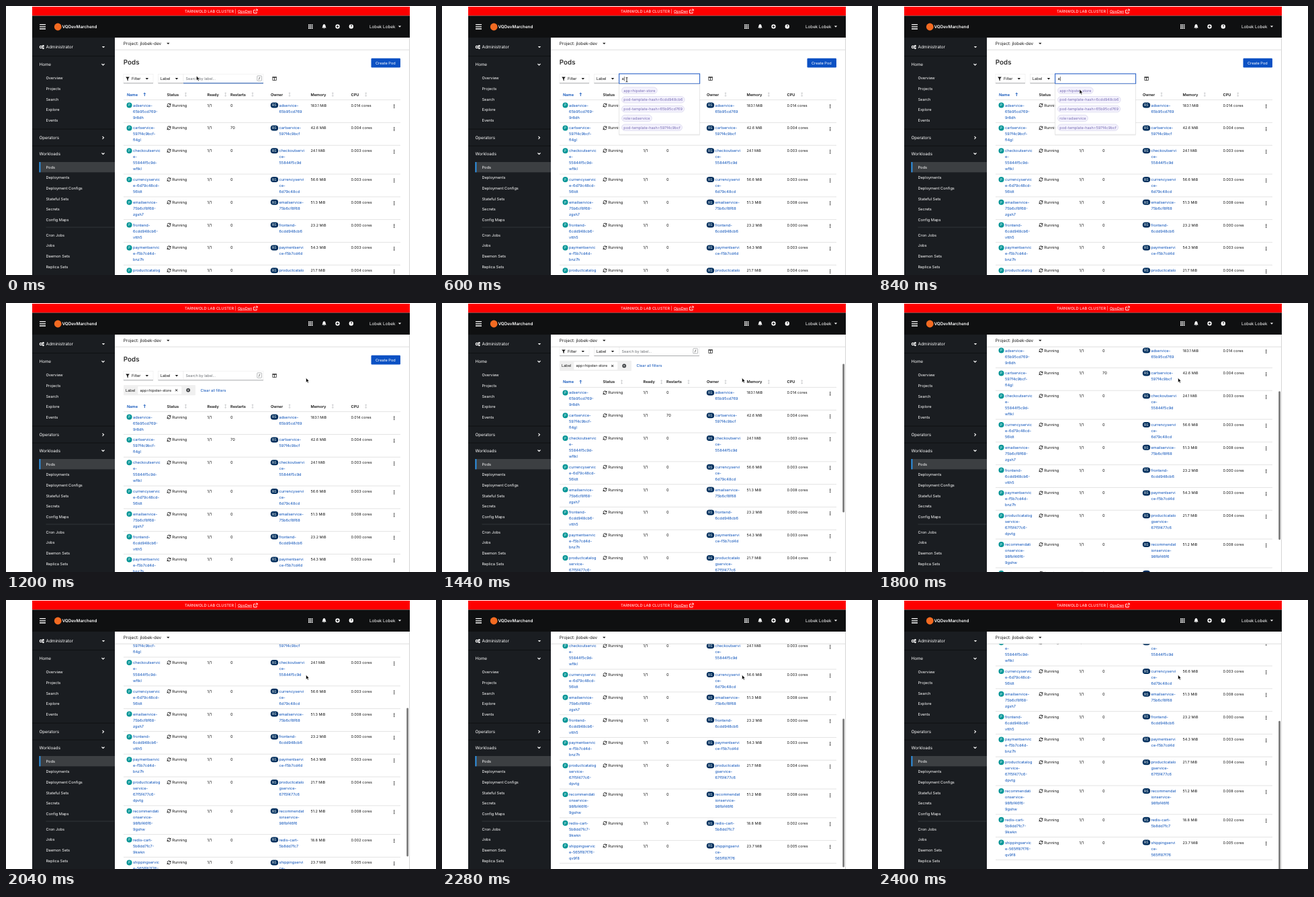
Write an HTML page that moves like this. It is 640 by 400 pixels and loops after 2520 ms.

```html
<!DOCTYPE html>
<html lang="en">
<head>
<meta charset="utf-8">
<title>Pod list filter</title>
<style>
html, body { margin: 0; width: 100%; height: 100%; overflow: hidden; background: #fff; }
svg { display: block; width: 640px; height: 400px; }
text { font-family: Inter, "Open Sans", sans-serif; text-rendering: geometricPrecision; white-space: pre; }
</style>
</head>
<body>
<svg id="stage" viewBox="0 0 640 400" xmlns="http://www.w3.org/2000/svg"></svg>
<script>
const INK = '#151515', LINK = '#0a50b8', GREY = '#6a6e73', RULE = '#d0d0d0';
const STEP = 120, STEPS = 21;

// y is the vertical middle of the capitals
const text = (x, y, s, fill = INK, size = 5.7, more = '') =>
  `<text x="${x}" y="${y + size * 0.36}" font-size="${size}" fill="${fill}" ${more}>${s}</text>`;
const rect = (x, y, w, h, fill, more = '') =>
  `<rect x="${x}" y="${y}" width="${w}" height="${h}" fill="${fill}" ${more}/>`;
const line = (d, stroke, width = 0.6, more = '') =>
  `<path d="${d}" fill="none" stroke="${stroke}" stroke-width="${width}" ${more}/>`;
const shape = (d, fill) => `<path d="${d}" fill="${fill}"/>`;
const disc = (x, y, r, fill) => `<circle cx="${x}" cy="${y}" r="${r}" fill="${fill}"/>`;
const group = (id, body, more = '') => `<g id="${id}" ${more}>${body}</g>`;

const caret = (x, y, fill = INK) => shape(`M${x - 2.2} ${y - 1.1}h4.4l-2.2 2.4z`, fill);
const chevron = (x, y, right) =>
  line(right ? `M${x - 1} ${y - 2}l2 2l-2 2` : `M${x - 2} ${y - 1}l2 2l2 -2`, '#fff', 1.1);
const cross = (x, y, r, color, width) =>
  line(`M${x - r} ${y - r}l${2 * r} ${2 * r}m0 ${-2 * r}l${-2 * r} ${2 * r}`, color, width);

function topBars() {
  let grid = '';
  for (let i = 0; i < 9; i++) grid += rect(450 + i % 3 * 2.4, 27.4 + Math.floor(i / 3) * 2.4, 1.7, 1.7, '#fff');
  return rect(39, 1, 562, 13.5, '#fe0000') +
    text(266, 7.6, 'TARNWOLD LAB CLUSTER | ', '#fff', 5.75) +
    text(345, 7.6, 'OpsDen', '#fff', 5.6, 'text-decoration="underline"') +
    line('M371 6h-2.4v4.6h4.6v-2M371 8.4l3 -3M371.8 5h2.4v2.4', '#fff', 0.9) +
    rect(39, 14.5, 562, 32.5, '#0f1011') +
    line('M50 27.6h9M50 30.8h9M50 34h9', '#fff', 1.3) +
    disc(77.2, 31, 5.4, '#f26a21') +
    text(83.5, 31, 'VQDevMarchend', '#fff', 6.3, 'font-weight="600"') +
    grid +
    shape('M470.3 32.4q1.1 -1 1.1 -3q.2 -1.9 2.1 -2.3q1.9 .4 2.1 2.3q0 2 1.1 3zM472.6 32.9h1.8q-.9 1.4 -1.8 0z', '#fff') +
    disc(493.5, 30.5, 3.2, '#fff') + line('M491.7 30.5h3.6M493.5 28.7v3.6', INK, 1) +
    disc(513.8, 30.5, 3.2, '#fff') + text(512.4, 30.5, '?', INK, 5, 'font-weight="700"') +
    text(541, 30.5, 'Lobek Lobek', '#fff', 6.3) + caret(586, 30.5, '#fff');
}

function sidebar() {
  const items = (first, names) =>
    names.map((name, i) => text(59.5, first + i * 15.65, name, '#fff', 5.65)).join('');
  const gear = (x, y, r) => `<circle cx="${x}" cy="${y}" r="${r}" fill="none" stroke="#fff" stroke-width="1.2"/>`;
  return rect(39, 47, 123, 353, '#1a1d21') +
    line('M39 74.5h123M39 183h123M39 208h123', '#0c0d0f', 0.8) +
    line('M59.5 329h102', '#3c3f42', 0.7) +
    gear(52, 61, 1.7) + gear(55.4, 59.4, 0.8) + gear(55.4, 62.8, 0.8) +
    text(59.5, 61, 'Administrator', '#fff', 6.4) + caret(145, 61, '#fff') +
    text(49.5, 87.2, 'Home', '#fff', 6.25) + chevron(144.5, 87) +
    items(107.3, ['Overview', 'Projects', 'Search', 'Explore', 'Events']) +
    text(49.5, 196, 'Operators', '#fff', 6.25) + chevron(144.5, 195.8, true) +
    text(49.5, 219.5, 'Workloads', '#fff', 6.25) + chevron(144.5, 219.5) +
    rect(49.5, 232, 112.5, 15.3, '#3c3f42') + rect(49.5, 232, 1.8, 15.3, '#2b9af3') +
    items(239.6, ['Pods', 'Deployments', 'Deployment Configs', 'Stateful Sets', 'Secrets', 'Config Maps']) +
    items(340.6, ['Cron Jobs', 'Jobs', 'Daemon Sets', 'Replica Sets']);
}

function toolbar() {
  const box = (x, w) => rect(x, 101.2, w, 13.6, '#fff', 'stroke="#ececec" stroke-width=".6"') +
    line(`M${x} 114.8h${w}`, '#8a8d90', 0.7);
  return text(174.8, 83.3, 'Pods', INK, 9.9, 'font-weight="500"') +
    rect(543.5, 77.8, 43.5, 13.6, '#0b51c4', 'rx="1.2"') + text(550, 84.6, 'Create Pod', '#fff', 5.65) +
    box(175, 44) + shape('M178.2 105.6h5.6l-2.1 2.6v3l-1.4 -1v-2z', INK) +
    text(187, 108, 'Filter') + caret(209.8, 108.2) +
    box(226.5, 37.5) + text(229.8, 108, 'Label') + caret(254, 108.2) +
    box(264, 119) +
    group('hint', text(267.5, 108, 'Search by label...', GREY, 5.5) +
      rect(373.8, 103.8, 6.8, 7.6, '#fff', 'rx="1" stroke="#8a8d90" stroke-width=".6"') +
      line('M378 105.6l-1.8 4', INK, 0.6)) +
    group('hover', line('M264 114.8h119', '#0b51c4', 0.8)) +
    rect(396.9, 105.6, 5.4, 5, '#fff', 'stroke="#151515" stroke-width=".7"') +
    line('M396.9 106.3h5.4M399.6 106v4.6', INK, 0.8);
}

const chips = () =>
  rect(175, 122, 107, 15.3, '#f0f0f0', 'rx="1"') + text(178, 129.6, 'Label', INK, 5.6) +
  rect(196.3, 123.9, 65, 11.6, '#fff', 'rx="1"') + text(199.5, 129.6, 'app=hipster-store', INK, 5.5) +
  cross(253.6, 129.7, 1.5, INK, 1) +
  disc(271.2, 129.6, 2.9, '#3c3f42') + cross(271.2, 129.6, 1.1, '#fff', 0.8) +
  text(289.5, 129.6, 'Clear all filters', LINK, 5.6);

// name, hash, pod suffix, memory, cores, restarts; "/" marks a wrap in pod and owner names
const PODS = [
  ['adservice-/65b95cd769-/9r8dh', 'adservice-/65b95cd769', '183.1', '0.014'],
  ['cartservice-/597f4c9bcf-/fl4gl', 'cartservice-/597f4c9bcf', '42.6', '0.004', 70],
  ['checkoutservic/e-/55844f5c9d-/wftkl', 'checkoutservi/ce-/55844f5c9d', '24.1', '0.003'],
  ['currencyservic/e-6d79c48cd-/56ldt', 'currencyservi/ce-/6d79c48cd', '56.6', '0.003'],
  ['emailservice-/75b6cf8f68-/zgsh7', 'emailservice-/75b6cf8f68', '51.3', '0.008'],
  ['frontend-/6cdd948cb6-/vtth5', 'frontend-/6cdd948cb6', '23.2', '0.000'],
  ['paymentservic/e-f5b7cd4d-/bnz7h', 'paymentservi/ce-f5b7cd4d', '54.3', '0.003'],
  ['productcatalog/service-/67f5f477c6-/dpvtg', 'productcatalo/gservice-/67f5f477c6', '21.7', '0.004'],
  ['recommendati/onservice-/98fbf46f6-/9gshw', 'recommendat/ionservice-/98fbf46f6', '51.2', '0.008'],
  ['redis-cart-/5b8dd7fc7-/9kwkn', 'redis-cart-/5b8dd7fc7', '18.8', '0.002'],
  ['shippingservic/e-565ff87f76-/qv9f8', 'shippingservi/ce-/565ff87f76', '23.7', '0.005'],
];

function table() {
  const bold = 'font-weight="600"';
  const columns = [['Status', 239.5, 267.5], ['Ready', 299.5, 326.7], ['Restarts', 334, 367],
    ['Owner', 394, 422], ['Memory', 453.5, 486.3], ['CPU', 513.5, 535.7]];
  const wrapped = (x, y, s) =>
    s.split('/').map((part, i) => text(x, y + i * 9, part, LINK, 5.65)).join('');
  const sync = (x, y) =>
    line(`M${x - 2.4} ${y - 0.4}a2.5 2.5 0 0 1 4.4 -1.2M${x + 2.4} ${y + 0.4}a2.5 2.5 0 0 1 -4.4 1.2`, INK, 0.9) +
    shape(`M${x + 2.8} ${y - 3}v2.6h-2.6zM${x - 2.8} ${y + 3}v-2.6h2.6z`, INK);

  let out = text(180, 131.6, 'Name', LINK, 5.7, bold) +
    line('M206.3 134v-4.8M204.8 130.7l1.5 -1.6l1.5 1.6', LINK, 0.9);
  for (const [name, x, arrow] of columns) {
    out += text(x, 131.6, name, INK, 5.7, bold) +
      line(`M${arrow} 129v5.2M${arrow - 1.2} 130l1.2 -1.2l1.2 1.2M${arrow - 1.2} 133.2l1.2 1.2l1.2 -1.2`, '#b0b3b6', 0.6);
  }
  out += line('M175 139.6h412', RULE);

  let y = 147.6;
  for (const [pod, owner, memory, cores, restarts = 0] of PODS) {
    out += disc(183.5, y, 4, '#009596') + text(181.9, y, 'P', '#fff', 5.2) + wrapped(189, y, pod) +
      sync(242.5, y) + text(247.3, y, 'Running') +
      text(299.5, y, '1/1') + text(334, y, restarts) +
      rect(393.8, y - 4, 11.4, 8, '#002f5d', 'rx="4"') + text(396, y, 'RS', '#fff', 5.2) + wrapped(406.5, y, owner) +
      text(453.5, y, memory + ' MiB', INK, 5.5) + text(513.5, y, cores + ' cores', INK, 5.5);
    for (const dy of [-0.7, 1.5, 3.7]) out += disc(577.7, y + dy, 0.75, INK);
    y += 6.8 + 9 * pod.split('/').length;
    out += line(`M175 ${y - 8}h412`, RULE);
  }
  return out;
}

function searchMenu() {
  const labels = ['app=hipster-store', 'pod-template-hash=6cdd948cb6', 'pod-template-hash=65b95cd769',
    'role=adservice', 'pod-template-hash=597f4c9bcf'];
  const pills = labels.map((label, i) => {
    const y = 125.6 + i * 13.75;
    return '<g class="pill">' +
      rect(267.6, y - 4.7, 0, 9.4, '#f4f2fd', 'rx="4.7" stroke="#cfcbe8" stroke-width=".6"') +
      text(270.3, y, label, '#7a6fb5', 5.55) + '</g>';
  }).join('');
  return group('focus', rect(263.6, 100.8, 120, 14.6, '#fff', 'stroke="#2b63c8" stroke-width="1.1"')) +
    group('menu', rect(263, 116.4, 121, 76, '#000', 'opacity=".07" rx="1"') +
      rect(263.6, 116, 119.8, 75, '#fff', 'stroke="#dedede" stroke-width=".6"') + pills +
      text(267.5, 108.2, 'a', INK, 5.7)) +
    group('caret', line('M0 105v6.5', INK, 0.6));
}

const stage = document.getElementById('stage');
stage.innerHTML =
  '<clipPath id="view"><rect x="162" y="65" width="438" height="335"/></clipPath>' +
  group('page', rect(39, 0, 562, 400, '#fff') +
    '<g clip-path="url(#view)">' +
    group('content', toolbar() + group('chips', chips()) + group('table', table()) + searchMenu()) + '</g>' +
    text(174.8, 55.6, 'Project: jlobek-dev', INK, 6.35) + caret(241.3, 55.8) +
    line('M162 65.2h438', RULE, 0.7) +
    topBars() + sidebar() + line('M600.5 47v353', '#c4c4c4', 0.7)) +
  group('thumb', rect(596.2, 0, 2.8, 221, '#7d7d7d', 'rx="1.4"')) +
  group('arrow', '<path d="M0 0v6.6l1.5 -1.3l1.1 2.4l1.1 -.5l-1.1 -2.3h2z" fill="#000" stroke="#fff" stroke-width=".5"/>') +
  group('beam', line('M-1.4 -3.3q1.4 0 1.4 1v4.6q0 1 -1.4 1M1.4 -3.3q-1.4 0 -1.4 1M0 2.3q0 1 1.4 1', '#000', 0.8));

for (const pill of document.querySelectorAll('.pill')) {
  const [box, label] = pill.children;
  box.setAttribute('width', label.getComputedTextLength() + 5.4);
}

const part = id => document.getElementById(id);
const show = (id, on) => part(id).setAttribute('display', on ? 'inline' : 'none');
const move = (id, x, y) => part(id).setAttribute('transform', `translate(${x} ${y})`);

const SCROLL_START = 10;
const SCROLL = [0, 15, 36.2, 55.5, 76.3, 99, 122, 144.2, 159, 169, 174];

function pointer(step) {
  if (step < 2) return [283.6, 104];
  if (step < 6) return [275, 109.6];
  if (step < 9) return [300, 124];
  return step === 9 ? [390, 117] : [446.6, 111.4];
}

function update(ms) {
  const step = Math.floor(ms / STEP) % STEPS;
  const focused = step >= 2 && step < 8;
  const typed = step >= 4 && step < 8;
  const filtered = step >= 8;
  const beam = step >= 2 && step < 6;
  const scroll = SCROLL[Math.max(0, step - SCROLL_START)];

  show('hover', step < 2);
  show('hint', !focused);
  show('focus', focused);
  show('menu', typed);
  show('caret', focused);
  move('caret', typed ? 271.4 : 267.4, 0);
  show('chips', filtered);
  move('table', 0, filtered ? 22 : 0);
  move('content', 0, -scroll);
  show('thumb', scroll > 0);
  move('thumb', 0, 67 + scroll * 0.648);
  show('beam', beam);
  show('arrow', !beam);
  move(beam ? 'beam' : 'arrow', ...pointer(step));
}

const start = performance.now();
function tick() {
  update(performance.now() - start);
  requestAnimationFrame(tick);
}
update(0);
requestAnimationFrame(tick);
</script>
</body>
</html>
```
